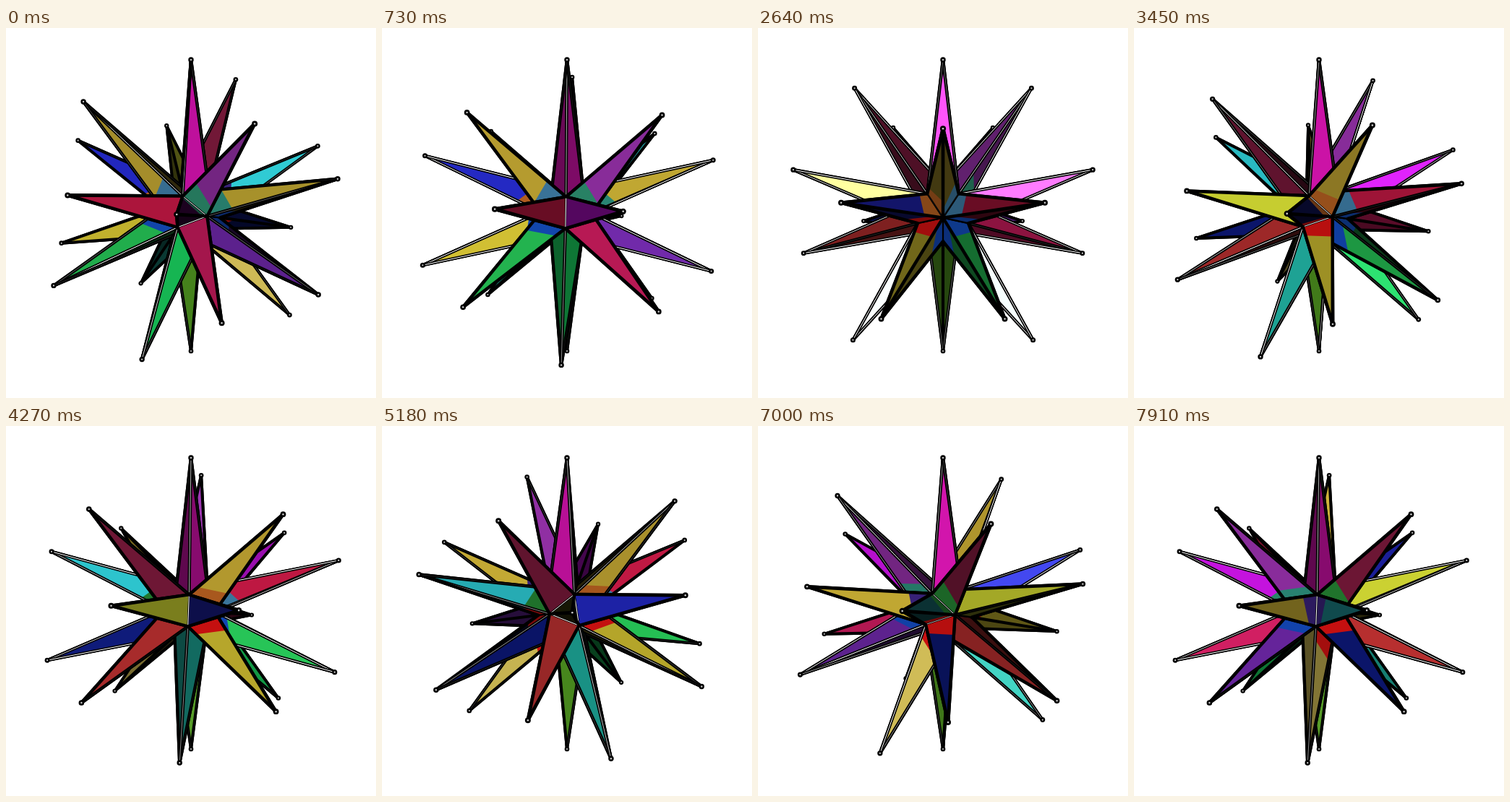
An HTML page with a canvas that plays this animation: 512 by 512 pixels, repeating every 8000 ms.

```html
<!DOCTYPE html>
<html lang="en">
<head>
<meta charset="utf-8">
<title>Spinning star</title>
<style>
  html, body { margin: 0; width: 100%; height: 100%; overflow: hidden; background: #fff; }
  canvas { display: block; width: 100vmin; height: 100vmin; }
</style>
</head>
<body>
<canvas id="stage" width="512" height="512"></canvas>
<script>
const ctx = document.getElementById('stage').getContext('2d');
const LOOP = 8000, STEPS = 88, STEP = LOOP / STEPS;
const CAMERA = 6.56, FOCAL = 1403, CORE = 0.19, SHINE = 34;
const RAD = Math.PI / 180, TILT = 20 * RAD;

const dot = (a, b) => a[0] * b[0] + a[1] * b[1] + a[2] * b[2];
const sub = (a, b) => a.map((v, i) => v - b[i]);
const mix = (a, b, t) => a.map((v, i) => v + (b[i] - v) * t);
const cross = (a, b) => [a[1] * b[2] - a[2] * b[1], a[2] * b[0] - a[0] * b[2], a[0] * b[1] - a[1] * b[0]];
const unit = a => a.map(v => v / Math.hypot(...a));

// A point on the unit sphere from its height and its azimuth in degrees.
function onSphere(height, azimuth) {
  const r = Math.sqrt(Math.max(0, 1 - height * height));
  return [r * Math.sin(azimuth * RAD), height, r * Math.cos(azimuth * RAD)];
}

const HIGH = Math.sqrt(5) / 3, LOW = 1 / 3;
const spikes = [
  ['U', 1, 0, '#eb14c0'], ['P', -1, 0, '#55a022'],
  ['R', HIGH, 0, '#e1c03a'], ['S', HIGH, 120, '#aa37c0'], ['T', HIGH, -120, '#891c42'],
  ['A', LOW, 37.76, '#e11c4e'], ['B', LOW, -37.76, '#282ee1'],
  ['C', LOW, 82.24, '#e114ff'], ['D', LOW, -82.24, '#f0f83a'],
  ['E', LOW, 157.76, '#e1c33a'], ['F', LOW, -157.76, '#32e1eb'],
  ['G', -LOW, 22.24, '#2ce464'], ['H', -LOW, -22.24, '#ebd737'],
  ['I', -LOW, 97.76, '#eb206c'], ['J', -LOW, -97.76, '#d43636'],
  ['K', -LOW, 142.24, '#802ec3'], ['L', -LOW, -142.24, '#0e1b88'],
  ['M', -HIGH, 60, '#1bde64'], ['N', -HIGH, -60, '#20b9a8'], ['O', -HIGH, 180, '#e4cd5c']
].map(([name, height, azimuth, hex]) => ({
  name, tip: onSphere(height, azimuth),
  color: [1, 3, 5].map(i => parseInt(hex.slice(i, i + 2), 16))
}));

const core = [];
for (const a of [0, 120, 240]) {
  core.push(onSphere(0.7947, a + 60), onSphere(0.1876, a), onSphere(-0.1876, a + 60), onSphere(-0.7947, a));
}

for (const s of spikes) {
  s.base = core.map((p, i) => [dot(p, s.tip), i]).sort((a, b) => b[0] - a[0]).slice(0, 3).map(e => e[1]);
}

// Coloured slivers in the valleys between neighbouring spikes.
const valleys = {
  AG: [20, 80, 195], BH: [225, 18, 18], CS: [45, 145, 112], BR: [190, 100, 34],
  AR: [64, 128, 170], GH: [20, 76, 195], EK: [20, 76, 195], FL: [225, 18, 18],
  LO: [215, 18, 18], FT: [36, 130, 50], ES: [45, 145, 125], EF: [60, 36, 130]
};
function valleyColor(s, i, j) {
  const other = spikes.find(o => o !== s && o.base.includes(i) && o.base.includes(j));
  return valleys[[s.name, other.name].sort().join('')];
}
for (const s of spikes) {
  s.faces = [[0, 1], [1, 2], [2, 0]].map(([a, b]) => ({ a, b, sliver: valleyColor(s, s.base[a], s.base[b]) }));
}

function toView([x, y, z], spin) {
  const c = Math.cos(spin), s = Math.sin(spin);
  const rx = x * c + z * s, rz = z * c - x * s;
  return [rx, y * Math.cos(TILT) - rz * Math.sin(TILT), y * Math.sin(TILT) + rz * Math.cos(TILT)];
}
const scaleAt = p => FOCAL / (CAMERA - p[2]);
const project = p => [256 + p[0] * scaleAt(p), 256 - p[1] * scaleAt(p)];

function fill(points, color) {
  ctx.beginPath();
  points.forEach(p => ctx.lineTo(...project(p)));
  ctx.closePath();
  ctx.fillStyle = `rgb(${color.map(v => Math.min(255, Math.round(v))).join()})`;
  ctx.fill();
}

// A tapering black rod with a highlight where it lies across the view.
function rod(p, q, radius) {
  const a = project(p), b = project(q);
  const angle = Math.atan2(b[1] - a[1], b[0] - a[0]);
  const ra = radius * scaleAt(p), rb = radius * scaleAt(q);
  ctx.fillStyle = '#000';
  ctx.beginPath();
  ctx.arc(...a, ra, angle + Math.PI / 2, angle - Math.PI / 2);
  ctx.arc(...b, rb, angle - Math.PI / 2, angle + Math.PI / 2);
  ctx.fill();
  const across = Math.sqrt(1 - unit(sub(q, p))[2] ** 2);
  const glow = Math.min(1, 1.5 * across ** SHINE);
  if (glow < 0.04) return;
  ctx.strokeStyle = `rgba(255,255,255,${glow})`;
  ctx.lineWidth = 1;
  ctx.beginPath();
  ctx.moveTo(...a);
  ctx.lineTo(...b);
  ctx.stroke();
}

function ball(p) {
  const [x, y] = project(p), r = scaleAt(p);
  for (const [size, color] of [[0.0165, '#000'], [0.0052, '#ccc']]) {
    ctx.fillStyle = color;
    ctx.beginPath();
    ctx.arc(x, y, size * r, 0, 7);
    ctx.fill();
  }
}

function drawSpike(s, tip, base) {
  const axis = mix(mix(base[0], base[1], 0.5), base[2], 1 / 3);
  const shown = [false, false, false];
  base.forEach(p => rod(p, tip, 0.0098));
  for (const { a, b, sliver } of s.faces) {
    const p = base[a], q = base[b];
    let n = unit(cross(sub(p, tip), sub(q, tip)));
    if (dot(n, sub(mix(p, q, 0.5), axis)) < 0) n = n.map(v => -v);
    if (dot(n, sub([0, 0, CAMERA], tip)) <= 0) continue;
    shown[a] = shown[b] = true;
    const light = Math.max(0, n[2]), gloss = 255 * light ** SHINE;
    fill([p, q, tip], s.color.map(v => v * light + gloss));
    if (sliver) {
      fill([p, mix(p, tip, 0.1), mix(q, tip, 0.2), q], sliver.map(v => v * (0.45 + 0.55 * light)));
    }
    rod(p, q, 0.005);
  }
  base.forEach((p, i) => shown[i] && rod(p, tip, 0.0098));
  ball(tip);
}

function draw(index) {
  const spin = (3 * index - 87) * RAD;
  const points = core.map(p => toView(p.map(v => v * CORE), spin));
  ctx.fillStyle = '#fff';
  ctx.fillRect(0, 0, 512, 512);
  spikes.map(s => ({ s, tip: toView(s.tip, spin) }))
    .sort((a, b) => a.tip[2] - b.tip[2])
    .forEach(({ s, tip }) => drawSpike(s, tip, s.base.map(i => points[i])));
}

// Steps start on whole hundredths of a second.
function stepAt(time) {
  const k = Math.round(time / STEP);
  return (Math.round(k * STEP / 10) * 10 > time ? k - 1 : k) % STEPS;
}

let last = -1;
function tick() {
  const index = stepAt(performance.now() % LOOP);
  if (index !== last) draw(last = index);
  requestAnimationFrame(tick);
}
tick();
</script>
</body>
</html>
```
